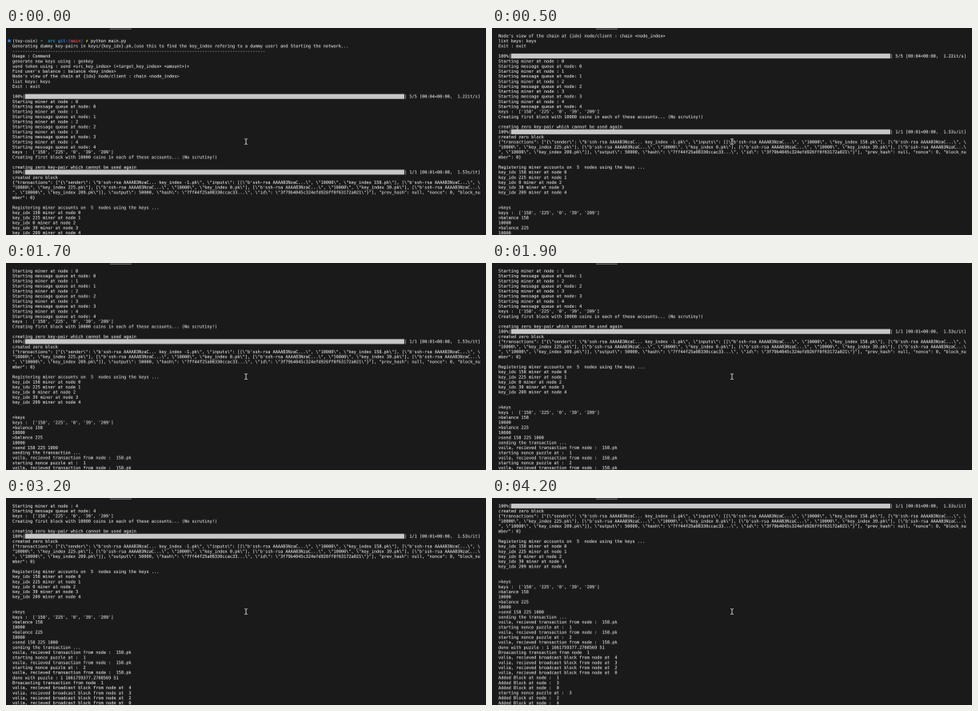
An HTML page with a canvas for the animation above (5 s loop, 600 by 259 pixels).

```html
<!DOCTYPE html>
<html lang="en">
<head>
<meta charset="utf-8">
<title>Terminal log</title>
<style>
  html, body { margin: 0; width: 100%; height: 100%; overflow: hidden; background: #1a1a1a; }
  canvas { display: block; }
</style>
</head>
<body>
<canvas id="stage" width="600" height="259"></canvas>
<script type="text/plain" id="log">

(toy-coin) ➜  src git:(main) ✗ python main.py
Generating dummy key-pairs in keys/{key_idx}.pk,(use this to find the key_index refering to a dummy user) and Starting the network...
----------------------------------------------------------------------------------------------------
Usage : Command
generate new keys using : genkey
send token using : send <src_key_index> (<target_key_index> <amount>)+
Find user's balance : balance <key_index>
Node's view of the chain at {idx} node/client : chain <node_index>
list keys: keys
Exit : exit

100%|BAR| 5/5 [00:04<00:00,  1.22it/s]
Starting miner at node : 0
Starting message queue at node: 0
Starting miner at node : 1
Starting message queue at node: 1
Starting miner at node : 2
Starting message queue at node: 2
Starting miner at node : 3
Starting message queue at node: 3
Starting miner at node : 4
Starting message queue at node: 4
keys :  ['158', '225', '0', '39', '209']
Creating first block with 10000 coins in each of these accounts... (No scrutiny!)

creating zero key-pair which cannot be used again
100%|BAR| 1/1 [00:01<00:00,  1.53s/it]
created zero block
{"transactions": ["{\"sender\": \"b'ssh-rsa AAAAB3NzaC... key_index -1.pk\", \"inputs\": [[\"b'ssh-rsa AAAAB3NzaC...\", \"10000\", \"key_index 158.pk\"], [\"b'ssh-rsa AAAAB3NzaC...\", \
"10000\", \"key_index 225.pk\"], [\"b'ssh-rsa AAAAB3NzaC...\", \"10000\", \"key_index 0.pk\"], [\"b'ssh-rsa AAAAB3NzaC...\", \"10000\", \"key_index 39.pk\"], [\"b'ssh-rsa AAAAB3NzaC...\
", \"10000\", \"key_index 209.pk\"]], \"output\": 50000, \"hash\": \"7ff44f25a08330ccac33...\", \"id\": \"3f79b4045c324efd926ff0f63172a021\"}"], "prev_hash": null, "nonce": 0, "block_nu
mber": 0}

Registering miner accounts on  5  nodes using the keys ...
key_idx 158 miner at node 0
key_idx 225 miner at node 1
key_idx 0 miner at node 2
key_idx 39 miner at node 3
key_idx 209 miner at node 4


>keys
keys :  ['158', '225', '0', '39', '209']
>balance 158
10000
>balance 225
10000
>send 158 225 1000
sending the transaction ...
voila, recieved transaction from node :  158.pk
starting nonce puzzle at :  1
voila, recieved transaction from node :  158.pk
starting nonce puzzle at :  2
voila, recieved transaction from node :  158.pk
done with puzzle : 1 1661759377.2708569 51
Broacasting transaction from node  1
volia, recieved broadcast block from node at  4
volia, recieved broadcast block from node at  3
volia, recieved broadcast block from node at  2
volia, recieved broadcast block from node at  0
Added Block at node :  1
Added Block at node :  3
Added Block at node :  0
starting nonce puzzle at :  3
Added Block at node :  2
Added Block at node :  4
</script>
<script>
const LOOP = 5000, STEP = 100;
const WIDTH = 600, TOP = 6.7, LEFT = 8, ROW = 6.316, ROWS = 40;
const FONT = 5.25, COLUMN = FONT * 0.60205, BASELINE = 5.05;
const SCALE = 4; // the log is drawn large, then shrunk for smooth small type
const INK = "#dadada";

// Each scroll burst: start time and the top row after every step.
const bursts = [
  [100, [1, 3, 5, 7, 8]],
  [1500, [9, 11, 13, 14, 15]],
  [2800, [16, 18, 19, 20, 21]],
  [3900, [22, 24, 26, 27]],
];
const promptColors = {
  "➜": "#23d18b", "src": "#29b8db", "git:(": "#3b8eea", "main": "#f14c4c", ")": "#3b8eea", "✗": "#e5e510",
};

const lines = document.getElementById("log").textContent.split("\n").slice(1);
const stage = document.getElementById("stage").getContext("2d");
const sheet = document.createElement("canvas");
sheet.width = WIDTH * SCALE;
sheet.height = lines.length * ROW * SCALE;
const pen = sheet.getContext("2d");

function write(text, column, row, color = INK) {
  const x = LEFT + column * COLUMN, y = row * ROW + BASELINE;
  pen.fillStyle = pen.strokeStyle = color;
  pen.fillText(text, x, y);
  pen.strokeText(text, x, y);
}

function writePrompt(line, row) {
  let column = 0;
  for (const part of line.split(/(➜|src|git:\(|main(?=\))|(?<=main)\)|✗)/)) {
    write(part, column, row, promptColors[part]);
    column += part.length;
  }
  pen.fillStyle = "#2f87d8";
  pen.beginPath();
  pen.arc(4, (row + 0.5) * ROW, 1.8, 0, 7);
  pen.fill();
}

function writeProgress(line, row) {
  const [label, count] = line.split("BAR");
  write(label, 0, row);
  write(count, 155, row);
  pen.fillStyle = "#c8c8c8";
  pen.fillRect(LEFT + 5 * COLUMN, row * ROW + 0.15, 150 * COLUMN, 6.1);
}

function drawSheet() {
  pen.scale(SCALE, SCALE);
  pen.font = `${FONT}px "DejaVu Sans Mono", monospace`;
  pen.textRendering = "geometricPrecision";
  pen.lineWidth = 0.12;
  lines.forEach((line, row) => {
    if (line.startsWith("(toy-coin)")) writePrompt(line, row);
    else if (line.includes("BAR")) writeProgress(line, row);
    else write(line, 0, row);
  });
}

function topRow(time) {
  let row = 0;
  for (const [start, rows] of bursts) {
    if (time < start) break;
    row = rows[Math.min(Math.floor((time - start) / STEP), rows.length - 1)];
  }
  return row;
}

const pointer = new Path2D("M298.2 138.6Q300 138.6 300 139.8Q300 138.6 301.8 138.6M300 139.8V144.4M298.2 145.6Q300 145.6 300 144.4Q300 145.6 301.8 145.6");

function draw() {
  const height = ROWS * ROW;
  stage.fillStyle = "#1a1a1a";
  stage.fillRect(0, 0, WIDTH, 259);
  stage.imageSmoothingQuality = "high";
  stage.drawImage(sheet, 0, topRow(performance.now() % LOOP) * ROW * SCALE, WIDTH * SCALE, height * SCALE,
    0, TOP, WIDTH, height);
  stage.fillStyle = "#9a9a9a";
  stage.fillRect(129.8, 0.8, 27, 0.8);
  stage.strokeStyle = "#dcdcdc";
  stage.lineWidth = 0.9;
  stage.stroke(pointer);
  requestAnimationFrame(draw);
}

drawSheet();
draw();
</script>
</body>
</html>
```
